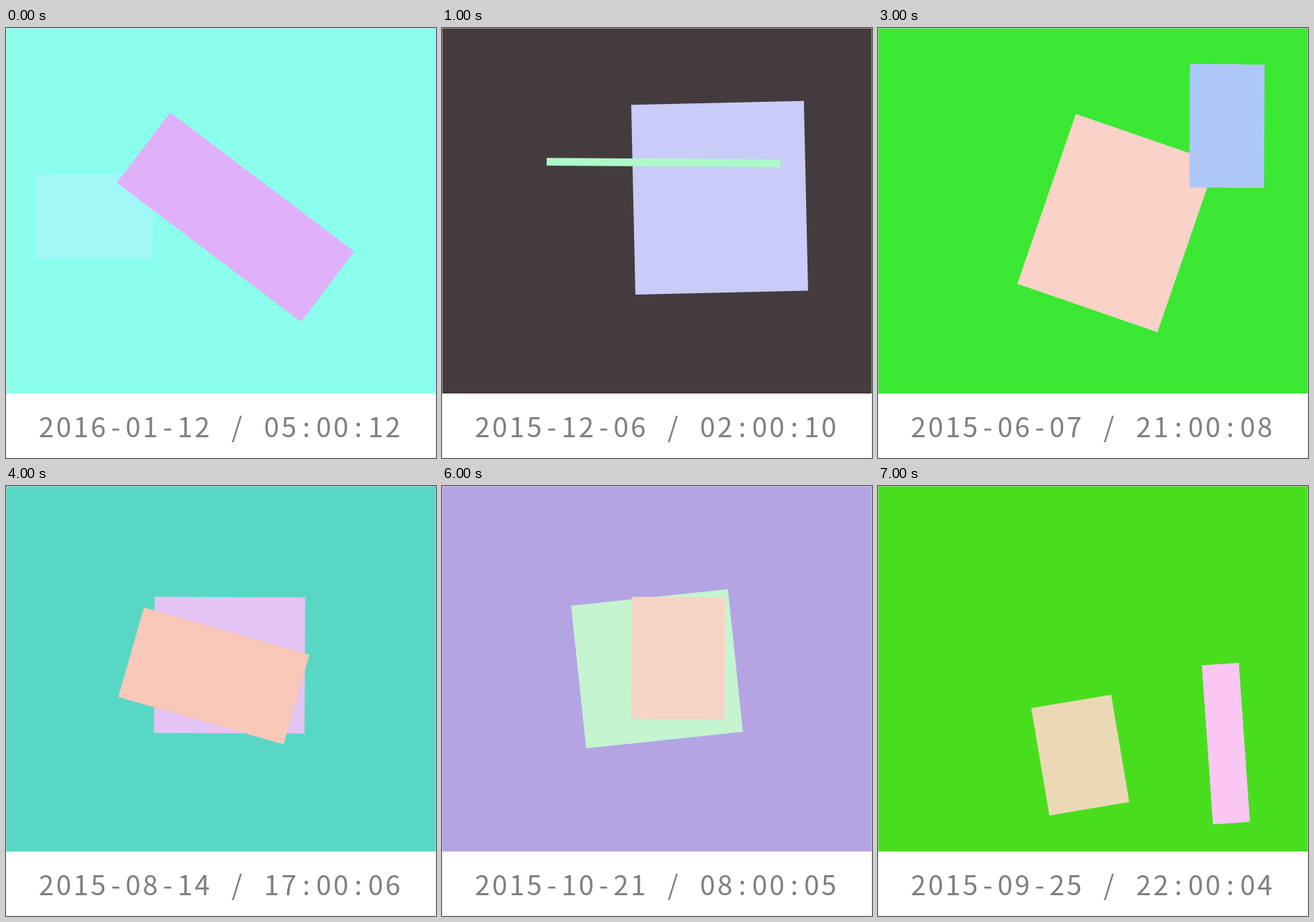
Write an HTML page that moves like this. It is 600 by 600 pixels and loops after 8000 ms.

```html
<!DOCTYPE html>
<html lang="en">
<head>
<meta charset="utf-8">
<title>Dated rectangles</title>
<style>
  html, body { margin: 0; width: 100%; height: 100%; overflow: hidden; background: #fff; }
  svg { display: block; width: 100vw; height: 100vh; }
  text { font: 300 38px "Noto Sans CJK JP", "Noto Sans CJK SC", "Noto Sans CJK", sans-serif; fill: #7f7f80; text-anchor: middle; }
</style>
</head>
<body>
<svg viewBox="0 0 600 600">
  <rect width="600" height="600" fill="#fff"/>
  <rect id="ground" width="600" height="510"/>
  <g id="shapes"></g>
  <text id="stamp" y="570.5"></text>
  <rect x=".5" y=".5" width="599" height="599" fill="none" stroke="#ddd" stroke-opacity=".5"/>
</svg>
<script>
const HOLD = 1000;
const PITCH = 24.18;

// Each shape: fill, centre x, centre y, width, height, angle; back to front.
const cards = [
  { stamp: '2016-01-12 / 05:00:12', ground: '#8cffec', shapes: [
    ['#a1f8f6', 123.5, 262.8, 164.3, 117, .2],
    ['#e0b0f8', 320.3, 263.9, 321.9, 123, 37.05]] },
  { stamp: '2015-12-06 / 02:00:10', ground: '#443b3e', shapes: [
    ['#c8ccf7', 387.4, 236.9, 241, 264.8, -1.27],
    ['#adfac9', 309, 187.8, 326, 10.7, .38]] },
  { stamp: '2015-09-18 / 10:00:07', ground: '#e6c8df', shapes: [
    ['#e8b5d4', 297.5, 368.2, 89, 90, 1],
    ['#bbfaa7', 286.5, 233, 249.8, 239.4, -9.25]] },
  { stamp: '2015-06-07 / 21:00:08', ground: '#3ae833', shapes: [
    ['#fad2c7', 333, 272.2, 206.8, 250.8, 19],
    ['#adc8f8', 487, 136.6, 104.2, 172.5, .3]] },
  { stamp: '2015-08-14 / 17:00:06', ground: '#58d8c4', shapes: [
    ['#e4c4f4', 312, 250, 210, 190, .3],
    ['#fac8b8', 290, 265, 240, 130, 16]] },
  { stamp: '2015-07-01 / 14:00:04', ground: '#6929d8', shapes: [
    ['#e6b9e9', 304.2, 238.6, 253, 188, .25],
    ['#faadcb', 274.3, 303.1, 383.6, 145.2, 31]] },
  { stamp: '2015-10-21 / 08:00:05', ground: '#b4a4e4', shapes: [
    ['#c4f4d0', 300, 255, 220, 200, -6],
    ['#f8d4c4', 330, 240, 130, 170, .4]] },
  { stamp: '2015-09-25 / 22:00:04', ground: '#48de1e', shapes: [
    ['#ebd9b5', 282.2, 375.5, 113.1, 152, -9.57],
    ['#fac6f4', 485.4, 359.4, 51.7, 222.4, -4]] }
];

const find = id => document.getElementById(id);
const ground = find('ground'), shapes = find('shapes'), stamp = find('stamp');

function make(tag, attrs) {
  const el = document.createElementNS('http://www.w3.org/2000/svg', tag);
  for (const key in attrs) el.setAttribute(key, attrs[key]);
  return el;
}

function box([fill, x, y, width, height, angle]) {
  return make('rect', {
    fill, width, height, x: -width / 2, y: -height / 2,
    transform: `translate(${x} ${y}) rotate(${angle})`
  });
}

function show(card) {
  ground.setAttribute('fill', card.ground);
  shapes.replaceChildren(...card.shapes.map(box));
  stamp.textContent = card.stamp;
}

// Fixed pitch: every character is centred in its own cell.
stamp.setAttribute('x', [...cards[0].stamp].map((_, i) => (56.3 + i * PITCH).toFixed(2)).join(' '));

const start = performance.now();
let shown = -1;

function tick(now) {
  const i = Math.floor(Math.max(0, now - start) / HOLD) % cards.length;
  if (i !== shown) show(cards[shown = i]);
  requestAnimationFrame(tick);
}
tick(start);
</script>
</body>
</html>
```
